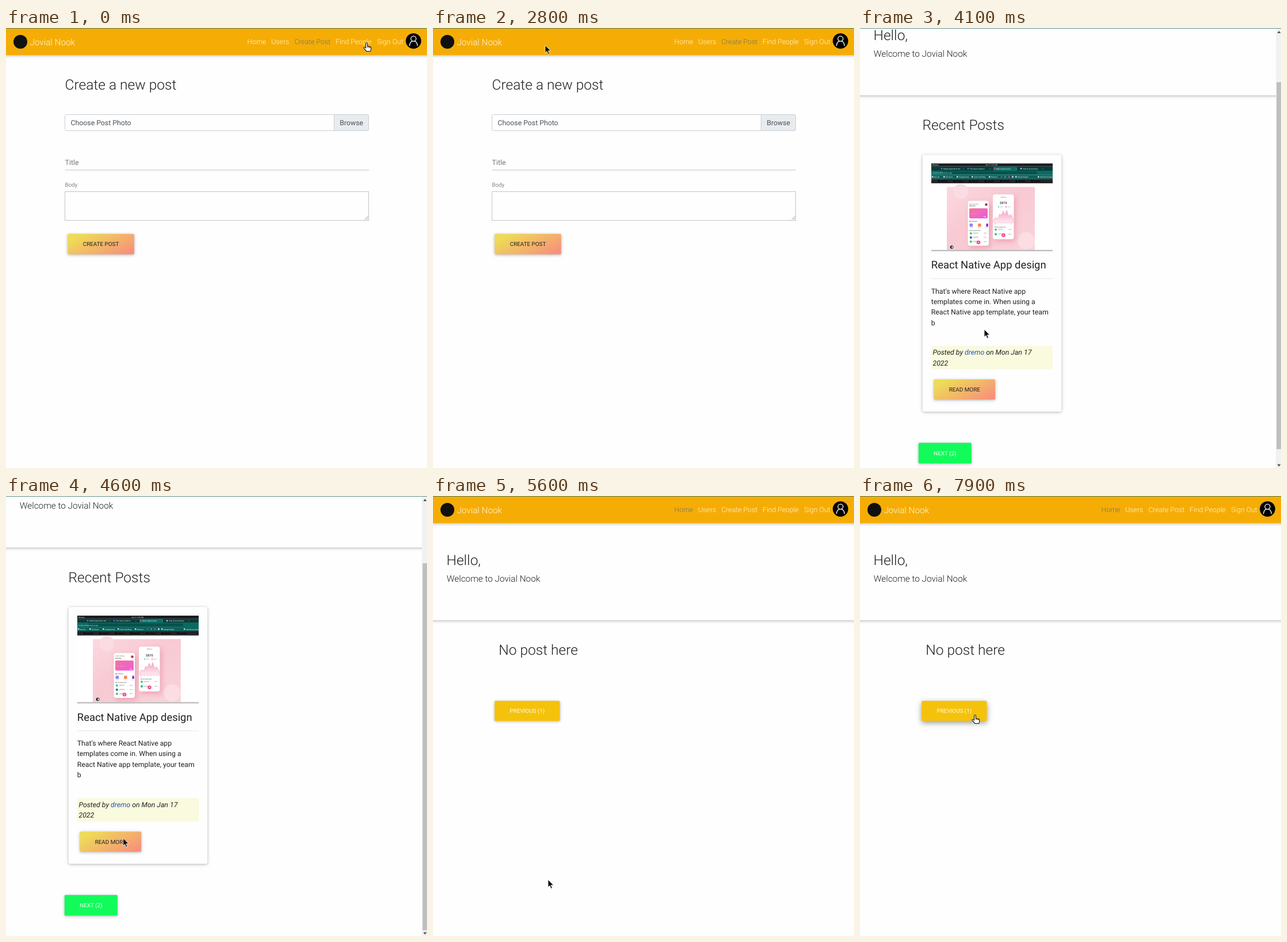
An HTML page for the animation above (8 s loop, 732 by 765 pixels).

```html
<!DOCTYPE html>
<html lang="en">
<head>
<meta charset="utf-8">
<title>Jovial Nook</title>
<style>
html, body { margin: 0; width: 100%; height: 100%; overflow: hidden; background: #fefefe; }
svg { display: block; width: 732px; height: 765px; }
text { font-family: Roboto, sans-serif; text-rendering: geometricPrecision; white-space: pre; }
.ui { font-family: "Open Sans", "Noto Sans", sans-serif; }
.up { filter: drop-shadow(0 1.5px 1.9px rgba(0,0,0,.2)) drop-shadow(0 1.5px 3.4px rgba(0,0,0,.12)); }
.hover .up { filter: drop-shadow(0 3.8px 4.2px rgba(0,0,0,.26)) drop-shadow(0 3px 5.7px rgba(0,0,0,.18)); }
</style>
</head>
<body>
<svg id="stage" viewBox="0 0 732 765">
  <defs>
    <linearGradient id="peach" x1="0" y1=".2" x2="1" y2=".8">
      <stop offset=".08" stop-color="#eedb57"/><stop offset="1" stop-color="#f7917b"/>
    </linearGradient>
    <linearGradient id="rose" x1="0" y1="0" x2="1" y2="1">
      <stop offset="0" stop-color="#fbd8df"/><stop offset=".45" stop-color="#f8c9d2"/><stop offset="1" stop-color="#fad3da"/>
    </linearGradient>
    <linearGradient id="pay" x1="0" y1="0" x2="1" y2="1">
      <stop offset="0" stop-color="#f4739a"/><stop offset="1" stop-color="#ea5ce0"/>
    </linearGradient>
    <linearGradient id="area" x1="0" y1="0" x2="0" y2="1">
      <stop offset="0" stop-color="#f7a3c1"/><stop offset="1" stop-color="#fdeaf1"/>
    </linearGradient>
  </defs>
</svg>
<script>
const INK = '#212121', BRAND = 'Jovial Nook';

const text = (x, y, size, str, fill = INK, weight = 400, more = '') =>
  `<text x="${x}" y="${y}" font-size="${size}" fill="${fill}" font-weight="${weight}" ${more}>${str}</text>`;
const rect = (x, y, w, h, fill, more = '') =>
  `<rect x="${x}" y="${y}" width="${w}" height="${h}" fill="${fill}" ${more}/>`;
const disc = (x, y, r, fill, more = '') =>
  `<circle cx="${x}" cy="${y}" r="${r}" fill="${fill}" ${more}/>`;
const path = (d, fill, more = '') => `<path d="${d}" fill="${fill}" ${more}/>`;
const line = (x1, x2, y, color) => rect(x1, y, x2 - x1, 1, color);

const button = (id, x, y, w, h, fill, label, color) =>
  `<g id="${id}">` + rect(x, y, w, h, fill, 'rx="1.6" class="up"') +
  text(x + w / 2, y + h / 2 + 3.5, 9.9, label, color, 400, 'text-anchor="middle"') + '</g>';

function navbar(active, dx = 0) {
  const links = { Home: 419.6, Users: 461.3, 'Create Post': 501.4, 'Find People': 573, 'Sign Out': 645.2 };
  const items = Object.entries(links).map(([name, x]) =>
    text(x + dx, 28.3, 12.27, name, name === active ? '#69747a' : '#fff6e0', 300));
  const ax = 708.5 + dx;
  return rect(-12, -9, 756, 56, '#f5ad05', 'class="up"') +
    disc(25, 24, 12, '#111') + text(41.4, 29.6, 15.33, BRAND, '#fff6e0', 300) + items.join('') +
    disc(ax, 22.6, 13.4, '#000') + disc(ax, 18.6, 4.5, 'none', 'stroke="#fff" stroke-width="1.3"') +
    path(`M${ax - 6.8} 30.6q.5-6.2 4.4-7.7M${ax + 6.8} 30.6q-.5-6.2-4.4-7.7`, 'none',
      'stroke="#fff" stroke-width="1.3" stroke-linecap="round"');
}

const hero = dx =>
  rect(-12, 40, 756, 176, '#fefefe', 'class="up"') + navbar('Home', dx) +
  text(23.6, 119.6, 24.53, 'Hello,', INK, 300) +
  text(23.8, 148.6, 15.33, 'Welcome to ' + BRAND, INK, 300);

function createPage() {
  const edge = 'stroke="#c9cdd1"';
  return navbar('Create Post') +
    text(102.6, 107.4, 24.53, 'Create a new post', INK, 300) +
    rect(102.5, 150.5, 528, 28, '#fefefe', edge + ' rx="3"') +
    path('M570.5 150.5H627.5a3 3 0 0 1 3 3V175.5a3 3 0 0 1-3 3H570.5Z', '#e9ecef', edge) +
    text(112.6, 168.5, 12.27, 'Choose Post Photo', '#495057') +
    text(580.3, 168.5, 12.27, 'Browse', '#495057') +
    text(102.6, 238.2, 12.27, 'Title', '#757575') + line(102.5, 631, 246.5, '#c4c4c4') +
    text(102.4, 276.4, 9.8, 'Body', '#858585') +
    rect(102.5, 284.5, 528, 50, '#fefefe', 'stroke="#c4c4c4"') +
    path('M624 333L629.500 327.500M627.500 333L629.500 331', 'none', 'stroke="#777" stroke-width=".8"') +
    button('make', 107.300, 358, 115.500, 35.400, 'url(#peach)', 'CREATE POST', INK);
}

// Small browser window with two phone mock-ups
function picture() {
  const tiny = (x, y, s, fill = '#d6efec', size = 2.9) => text(x, y, size, s, fill, 500);
  let s = rect(124, 334.5, 211, 152.5, '#fff') +
    rect(124, 334.5, 211, 5.200, '#1d1c1e') + tiny(126, 338.2, 'Browser') + tiny(218, 338.2, 'Jan 17  2:27 PM') +
    rect(124, 339.700, 211, 7.600, '#083b38') + rect(232, 340.300, 41, 7, '#0b6d65') +
    rect(124, 347, 211, 7.600, '#0a6a62') + rect(142, 348, 166, 5.200, '#07524c', 'rx="2.5"') +
    rect(124, 354.600, 211, 6.800, '#0a6059') + rect(124, 361.400, 211, 7.600, '#242426') +
    tiny(126, 352, 'localhost:3000/native-app', '#a7d2ce');
  ['Mobile Application Des', 'The Career Guide to', 'Native App by team', 'Chat (2) post design'].forEach((tab, i) => {
    const x = 142 + i * 46;
    s += disc(x, 343.5, 1.3, ['#5a7cf0', '#8a6cf0', '#e24a78', '#ddd'][i]) + tiny(x + 3, 344.6, tab) + tiny(x + 37, 344.6, '×');
  });
  [['Dev Fly', 125], ['Fun Facts', 145], ['Programming', 168], ['Learn Tech Blog', 194], ['Business', 224],
    ['Design Plugins', 270], ['Other Bookmarks', 309]].forEach(([b, x]) => {
    s += rect(x, 356.800, 2.500, 2.100, '#e9f5f4') + tiny(x + 4, 359.1, b, '#e9f5f4', 2.8);
  });
  for (let i = 0; i < 4; i++) s += disc(246 + i * 6.5, 357.9, 1.4, ['#e03a3a', '#2bb5a8', '#d8459a', '#efefef'][i]);
  for (let i = 0; i < 7; i++) s += rect(140 + i * 27, 364.500, 12, 1.600, '#09090a') + disc(137 + i * 27, 365.3, 1.8, '#09090a');
  s += rect(151, 375.3, 153, 109.7, 'url(#rose)') + disc(175, 383, 13, '#fbdce2') + disc(289, 469, 15, '#fbdde3');

  const phone = (x, y) => rect(x, y, 36.500, 78, '#fff', 'rx="4" style="filter:drop-shadow(3px 4px 4px rgba(215,100,130,.38))"');
  s += phone(187.5, 399.5) + tiny(190, 405.5, 'Good morning', '#777', 2.5) + tiny(190, 409, 'Alex Doe', '#333', 2.7) +
    disc(219.500, 406, 2.300, '#b62d54') + rect(190, 412.500, 32, 17.500, 'url(#pay)', 'rx="1.8"') +
    tiny(192.500, 423, '••••  ••••  ••••', '#ffe1f4') + tiny(215, 428, 'Pay', '#fff', 2.6) +
    tiny(190, 436, 'My services', '#444', 2.600);
  ['#8d84f4', '#f68a59', '#7a22c9'].forEach((c, i) => {
    s += rect(190.500 + i * 14.500, 439, i < 2 ? 5.600 : 3.200, 5.600, c, 'rx="1.2"') + rect(191 + i * 13, 446, 5, .6, '#bbb');
  });
  s += tiny(190, 451.500, 'Recent payments', '#555', 2.500);
  ['#29d58b', '#395c9d', '#35c877'].forEach((c, i) => {
    const y = 456 + i * 7.3;
    s += disc(192.8, y, 2, c) + rect(197, y - 1, 9, .7, '#888') + rect(197, y + .8, 6, .5, '#ccc') + rect(215, y - .6, 5, .7, '#999');
  });
  s += disc(206, 471.8, 3.3, '#f04b93') + disc(206, 471.8, 1.1, '#fbc3dc');

  s += phone(231, 388.3) + tiny(245, 393.600, 'Balance', '#777', 2.500) +
    text(249.300, 405, 5.500, '$870', '#333', 500, 'text-anchor="middle"') +
    disc(241, 410, 1, '#29c58b') + disc(254, 410, 1, '#f04b93') + rect(243, 409.600, 6, .7, '#aaa') + rect(256, 409.600, 6, .7, '#aaa') +
    path('M232 437.500V432L236 428.500L239.500 430.500L243 422L246 424.500L249 417L252 424L255 415.500L258.500 426L262 423L266.500 431V437.500Z',
      'url(#area)', 'stroke="#f39bbb" stroke-width=".5"');
  for (let i = 0; i < 6; i++) s += rect(233.500 + i * 5.600, 439, 2.600, .7, i ? '#c8c8c8' : '#f04b93');
  s += tiny(234, 445.500, 'Recent payments', '#555', 2.500);
  ['#29d58b', '#26b775'].forEach((c, i) => {
    const y = 449.5 + i * 8;
    s += disc(236, y, 2, c) + rect(240, y - 1, 9, .7, '#999') + rect(240, y + .8, 6, .5, '#ccc') + rect(258, y - .6, 5, .7, '#999');
  });
  s += disc(249.5, 459.2, 3.3, '#f04b93') + disc(249.5, 459.2, 1.1, '#fbc3dc') +
    disc(159.5, 480, 3.600, '#fff') + disc(159.5, 480, 3, '#222') + path('M159.500 478a2 2 0 0 1 0 4Z', '#fff');
  return s + rect(124, 484.8, 211, 2.3, '#bcbcbc');
}

function homePage() {
  const body = ["That's where React Native app", 'templates come in. When using a',
    'React Native app template, your team', 'b'];
  return hero(-11.6) +
    text(108.5, 276, 24.53, 'Recent Posts', INK, 300) +
    rect(108.700, 319.500, 241.500, 446.500, '#fefefe', 'rx="3" class="up"') + picture() +
    text(123.8, 517, 18.4, 'React Native App design') + line(124, 335, 534.2, '#e6e6e6') +
    body.map((s, i) => text(123.8, 560.5 + i * 18.4, 12.27, s)).join('') +
    rect(124, 652, 211, 40.5, '#f9fade') +
    text(126.5, 667.2, 12.27, 'Posted by <tspan fill="#2354c7">dremo</tspan> on Mon Jan 17', INK, 400, 'font-style="italic"') +
    text(126.5, 685.6, 12.27, '2022', INK, 400, 'font-style="italic"') +
    button('more', 128.500, 710, 106.500, 35, 'url(#peach)', 'READ MORE', INK) +
    button('next', 101.800, 820.200, 92, 35.800, '#12fb5b', 'NEXT (2)', '#e4ffec');
}

const emptyPage = () => hero(0) + text(114.3, 276, 24.53, 'No post here', INK, 300) +
  button('prev', 107.200, 356.300, 113.300, 34.700, '#f5c20b', 'PREVIOUS (1)', '#fffbea');

const scrollbar = () => rect(723, 0, 9, 765, '#f1f1f1') + rect(724.3, 12, 8, 638, '#bfbfbf', 'id="thumb"') +
  path('M725.500 9L728.500 5L731.500 9Z', '#505050') + path('M725.500 758.500L728.500 762.500L731.500 758.500Z', '#505050');

const status = (id, w, s) => `<g id="${id}">` +
  path(`M0 749.500H${w - 2}q2 0 2 2V765H0Z`, '#073f3d') + text(3, 761.700, 11.4, s, '#fff', 400, 'class="ui"') + '</g>';

const group = (id, html) => `<g id="${id}">${html}</g>`;

document.getElementById('stage').insertAdjacentHTML('beforeend',
  rect(0, 0, 732, 765, '#fefefe') +
  group('create', createPage()) +
  group('home', group('scroll', homePage()) + scrollbar()) +
  group('empty', emptyPage()) +
  rect(0, 0, 732, 1, '#2c6a66', 'opacity=".75"') +
  status('longUrl', 242.5, 'localhost:3000/…/61e51a700722123ccc808…') +
  status('rootUrl', 83.5, 'localhost:3000') +
  group('tip', rect(687.500, 37.500, 48, 18.500, '#2b2b2b', 'stroke="#4a4a4a" style="filter:drop-shadow(0 2px 3px rgba(0,0,0,.3))"') +
    text(693, 51, 11.600, 'Profile', '#fff', 400, 'class="ui"')) +
  group('arrow', path('M0 0V13.200L3 10.500L5.200 15.600L7.400 14.600L5.300 9.700H9.600Z', '#111', 'stroke="#fff" stroke-width=".8"')) +
  group('hand', path('M-1.400 1.200a1.400 1.400 0 0 1 2.800 0V5.600L6 6.600q1.900.5 1.800 2.300q0 2.800-1.200 5.600H-.3q-1.800-2.900-4.400-5.200q-.9-1.300.4-1.800q1.200-.3 2.900 1.500Z',
    '#fff', 'stroke="#111" stroke-width="1.100" stroke-linejoin="round"') +
    path('M1.400 5.600V8.500M3.600 6.400V8.800M5.700 6.900V9', 'none', 'stroke="#111" stroke-width=".7"')));

const el = Object.fromEntries([...document.querySelectorAll('[id]')].map(e => [e.id, e]));

// [ms, x, y] pointer tip
const moves = [
  [0, 627, 26], [400, 668, 27], [900, 721, 25], [1000, 721, 25], [1100, 707, 22], [2100, 707, 22],
  [2400, 520, 29], [2700, 250, 34], [3000, 85, 22], [3300, 88, 24], [3500, 116, 127], [3600, 116, 127],
  [3700, 189, 330], [3800, 189, 330], [3900, 206, 470], [4100, 216, 524], [4400, 214, 545], [4900, 188, 670],
  [5300, 172, 720], [5500, 174, 717], [5600, 200, 667], [5700, 235, 622], [5800, 218, 582], [6000, 218, 582],
  [6300, 222, 455], [6600, 210, 342], [7300, 210, 342], [7900, 200, 381]];
const scrolls = [[3800, 0], [3900, 24], [4000, 66], [4100, 99], [4200, 118], [4300, 126.5]];
const longFade = [[600, 0], [700, 1], [2200, 1], [2400, 0]];
const rootFade = [[2800, 0], [2900, 1], [3300, 1], [3500, .27], [3600, .27], [3700, 0]];

function at(table, t, col = 1) {
  const i = table.findIndex(row => row[0] > t);
  if (i === 0) return table[0][col];
  if (i < 0) return table[table.length - 1][col];
  const a = table[i - 1], b = table[i];
  return a[col] + (b[col] - a[col]) * (t - a[0]) / (b[0] - a[0]);
}

const show = (node, on) => { node.style.display = on ? '' : 'none'; };
const inside = (x, y, bx, by, w, h) => x >= bx && x <= bx + w && y >= by && y <= by + h;

function draw(ms) {
  const t = Math.floor(ms / 100) * 100;
  const page = t < 3200 ? 'create' : t < 5500 ? 'home' : 'empty';
  const x = at(moves, t), y = at(moves, t, 2), scroll = at(scrolls, t);
  for (const id of ['create', 'home', 'empty']) show(el[id], id === page);
  el.scroll.setAttribute('transform', `translate(0 ${-scroll})`);
  el.thumb.setAttribute('y', 12 + scroll * .83);

  const overNext = page === 'home' && inside(x, y + scroll, 102, 820, 92, 36);
  const overPrev = page === 'empty' && inside(x, y, 107, 356, 113, 35);
  const overNav = scroll === 0 && y < 40 && (x < 120 || x > 415);
  el.next.classList.toggle('hover', overNext);
  el.prev.classList.toggle('hover', overPrev);

  const hand = overNext || overPrev || overNav;
  show(el.hand, hand);
  show(el.arrow, !hand);
  el[hand ? 'hand' : 'arrow'].setAttribute('transform', `translate(${x} ${y})`);
  show(el.tip, t >= 1800 && t < 2200);
  el.longUrl.style.opacity = at(longFade, t);
  el.rootUrl.style.opacity = at(rootFade, t);
}

const start = performance.now();
function tick() {
  draw((performance.now() - start) % 8000);
  requestAnimationFrame(tick);
}
draw(0);
requestAnimationFrame(tick);
</script>
</body>
</html>
```
